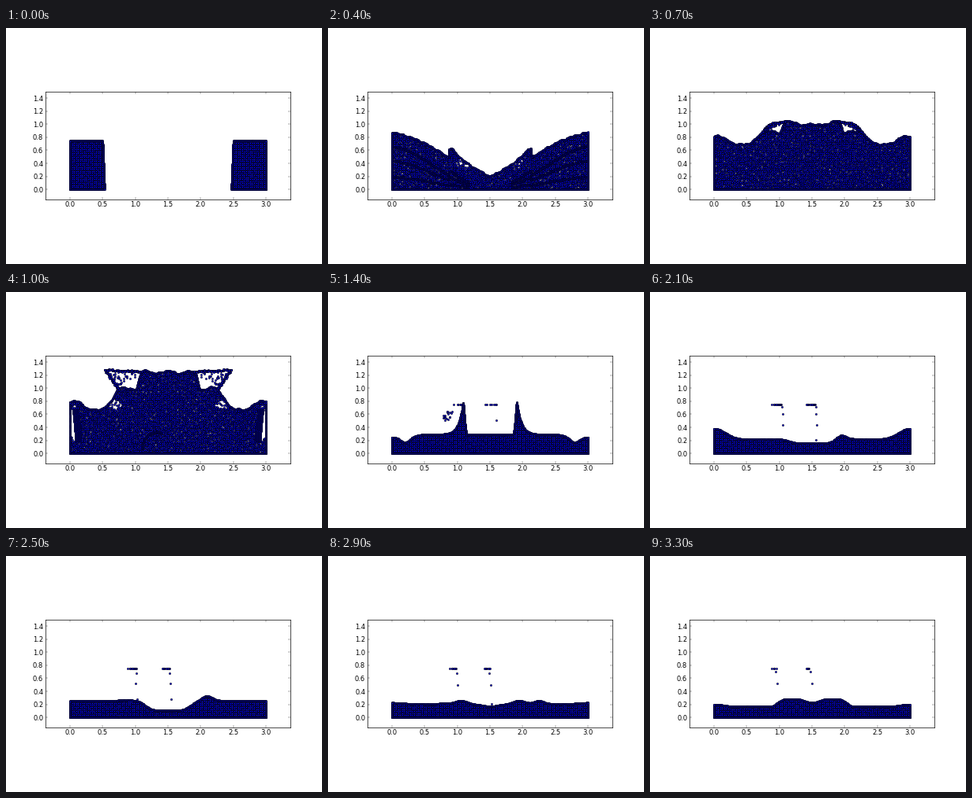
Write a matplotlib script that moves like this. It is 400 by 300 pixels and loops after 3.4 s.

```python
import numpy as np
import matplotlib.pyplot as plt
from matplotlib.animation import FuncAnimation

FRAMES, STEP_MS = 34, 100
WIDTH, LEDGE, FALL, PITCH = 3.0, 0.75, 0.0315, 0.02

plt.rcParams.update({"font.family": "DejaVu Sans", "font.size": 12})
rng = np.random.default_rng(4)


def mix(a, b, u):
    return a + (b - a) * u


def step(m, lo, hi):
    u = np.clip((m - lo) / (hi - lo), 0, 1)
    return u * u * (3 - 2 * u)


def bump(m, centre, width):
    return np.exp(-((m - centre) / width) ** 2)


# Surface shapes; m is the distance from the nearer wall.
def impact(m):
    lip = .17 * (m > .87) * np.exp(-abs(m - .91) / .2)
    return .88 - .46 * m + .06 * np.sin(np.pi * np.minimum(m, .9) / .9) + lip


def crest(m):
    rise = .34 * step(m, .45, .8) + .25 * step(m, 1, 1.1)
    return .8 - .14 * step(m, 0, .45) + rise + .02 * np.cos(18 * (m - 1.5))


def spikes(m):
    jet = .5 * np.exp(-abs(m - 1.09) / .07) * (1 - step(m, 1.09, 1.15))
    return .25 - .08 * bump(m, .2, .1) + .04 * step(m, .2, .5) + jet


def slosh(m):
    return .19 + .29 * bump(m, 0, .24)


def trough(m):
    return .25 - .135 * step(m, 1, 1.3) + .015 * bump(m, .85, .2)


def humps(m):
    hill = .12 * step(m, .85, 1.1) - .06 * step(m, 1.25, 1.5)
    return .165 + .035 * bump(m, 0, .2) + hill


def collapse(m, u):
    """Column spreading from the wall until the two fronts meet."""
    front, lip = mix(.53, 1.5, u), mix(.5, .9, u)
    block = LEDGE * np.clip((front - m) / (front - lip), 0, 1)
    return mix(block, impact(1.5 * m / front), u) * (m <= front)


def wildness(t):
    return float(np.clip(min((t - 1) / 3, (14 - t) / 3), 0, 1))


def surface(x, t):
    m = WIDTH / 2 - abs(x - WIDTH / 2)
    if t <= 4:
        h = collapse(m, (t / 4) ** 1.2)
    elif t <= 10:
        h = mix(crest(m), impact(m), ((10 - t) / 6) ** 2)
    elif t <= 14:
        h = mix(crest(m), spikes(m), ((t - 10) / 4) ** 2)
    elif t <= 18:
        h = mix(slosh(m), spikes(m), ((18 - t) / 4) ** 2)
    elif t <= 25:
        h = mix(slosh(m), trough(m), (t - 18) / 7)
    else:
        h = mix(trough(m), humps(m), (t - 25) / 8)
    if 14 < t < 33:
        # a swell drifting to the right
        swell = .07 * np.sin(np.pi * (t - 14) / 19)
        h = h + swell * bump(x, 1.83 + .27 * (t - 18) / 7, .1)
    ripple = np.sin(31 * x + t) + np.sin(57 * x - 2 * t)
    return h + (h > .05) * .006 * wildness(t) * ripple


def trace(x, y, gap):
    """Evenly spaced points along a curve."""
    s = np.append(0, np.cumsum(np.hypot(np.diff(x), np.diff(y))))
    q = np.arange(0, s[-1] + gap / 2, gap)
    return np.column_stack([np.interp(q, s, x), np.interp(q, s, y)])


def mirrored(parts):
    return parts + [np.column_stack([WIDTH - p[:, 0], p[:, 1]]) for p in parts]


# Thinned areas on both sides: time, centre, radii, share kept
HOLES = [(4, 1.1, .42, .12, .1, .6),
         (10, .06, .47, .06, .28, 0),
         (10, .68, .75, .1, .07, .35)]

GX, GY = [g.ravel() for g in np.meshgrid(np.arange(0, WIDTH + .001, PITCH),
                                         np.arange(0, 1.5, PITCH))]
PHASE = rng.uniform(0, 2 * np.pi, (2, GX.size))
CHANCE = rng.random(GX.size)
SPRAY = rng.random((45, 2))
FUZZ = rng.normal(0, .006, (200, 2))
XS = np.linspace(0, WIDTH, 1001)


def body(t):
    amp = .002 + .004 * wildness(t)
    x = np.clip(GX + amp * np.cos(PHASE[0] + .6 * t), 0, WIDTH)
    y = np.maximum(GY + amp * np.sin(PHASE[1] + .6 * t), 0)
    m = np.minimum(x, WIDTH - x)
    keep = y < surface(x, t)
    for when, cx, cy, rx, ry, share in HOLES:
        size = max(1e-6, 1 - abs(t - when) / 3)
        inside = np.hypot((m - cx) / rx, (y - cy) / ry) < size
        keep &= ~inside | (CHANCE < share)
    return np.column_stack([x, y])[keep]


def outline(t):
    h = surface(XS, t)
    top = trace(XS, h, .012)
    floor = XS[::4][h[::4] > .01]
    wall = np.arange(0, h[0], .012)
    sides = mirrored([np.column_stack([0 * wall, wall])])
    return [top[top[:, 1] > .01], np.column_stack([floor, 0 * floor]), *sides]


def streaks(t):
    """Dark layers and curls inside the water during the collision."""
    parts = []
    if 2 <= t <= 6:
        x = XS[:400]
        for share in (.22, .5, .76):
            bent = share * surface(x, t) * bump(x, 0, 1.2)
            parts += mirrored([trace(x, bent, .007)])
    if 8 <= t <= 12:
        y = np.linspace(.2, .7, 60)
        for k in range(4):
            x = .09 + .025 * k - .1 * y ** 2
            parts += mirrored([trace(x, y, .012)])
        a = np.linspace(np.pi, 1.2, 80)
        parts.append(trace(1.34 + .24 * np.cos(a), .07 + .26 * np.sin(a), .007))
    return parts


def arms(t):
    """Sheets thrown outward on both sides of the splash."""
    if not 7 <= t <= 13:
        return []
    s = t - 10
    tip = np.array([.54 + (.08 * s if s > 0 else -.1 * s), 1.28 - FALL * s * s])
    foot, inner = [np.array([x, surface(x, t)]) for x in (.74, 1.1)]
    parts = []
    for end in (foot, inner):
        for gap in (.011, .013):
            p = trace(np.array([tip[0], end[0]]), np.array([tip[1], end[1]]), gap)
            parts.append(p + FUZZ[:len(p)])
    u, v = SPRAY[:, :1], SPRAY[:, 1:]
    parts.append(tip + np.sqrt(u) * ((1 - v) * (foot - tip) + v * (inner - tip)))
    return mirrored(parts)


def ledge(lo, hi, n=26):
    """Drops resting in a row and letting go one by one, outer end first."""
    u = np.linspace(0, 1, n)
    x = hi - (hi - lo) * u ** 2 + rng.normal(0, .008, n)
    return np.column_stack([x, rng.uniform(12.5, 17, n), 11 + 27 * u ** 1.5])


spray = np.column_stack([rng.uniform(.78, .92, 18), np.full(18, 13),
                         rng.uniform(11.2, 12.4, 18)])
DROPS = np.vstack([spray, ledge(.9, 1.08), ledge(1.42, 1.6)])


def drops(t):
    x, born, free = DROPS.T
    y = LEDGE - FALL * np.maximum(t - free, 0) ** 2
    seen = (t >= born) & (y > surface(x, t))
    return np.column_stack([x, y])[seen]


fig = plt.figure(figsize=(8, 6), dpi=50, facecolor="white")
ax = fig.add_axes([.125, 81.7 / 300, .775, 137.3 / 300])
ax.set(xlim=(-.375, 3.375), ylim=(-.16, 1.501))
ax.set_xticks(np.arange(0, 3.1, .5))
ax.set_yticks(np.arange(0, 1.5, .2))
ax.xaxis.set_major_formatter("{x:.1f}")
ax.yaxis.set_major_formatter("{x:.1f}")
ax.tick_params(direction="in", top=True, right=True, length=4, width=.5, pad=4)
ax.tick_params(axis="x", pad=3)
dots = ax.scatter([], [], s=10, c="blue", edgecolors="black", linewidths=.85)
ax.spines[:].set_linewidth(1)


def draw(t):
    parts = [body(t), *streaks(t), *outline(t), *arms(t), drops(t)]
    dots.set_offsets(np.vstack(parts))
    return dots,


anim = FuncAnimation(fig, draw, frames=FRAMES, interval=STEP_MS, repeat=True,
                     repeat_delay=0, blit=False)
plt.show()
```
